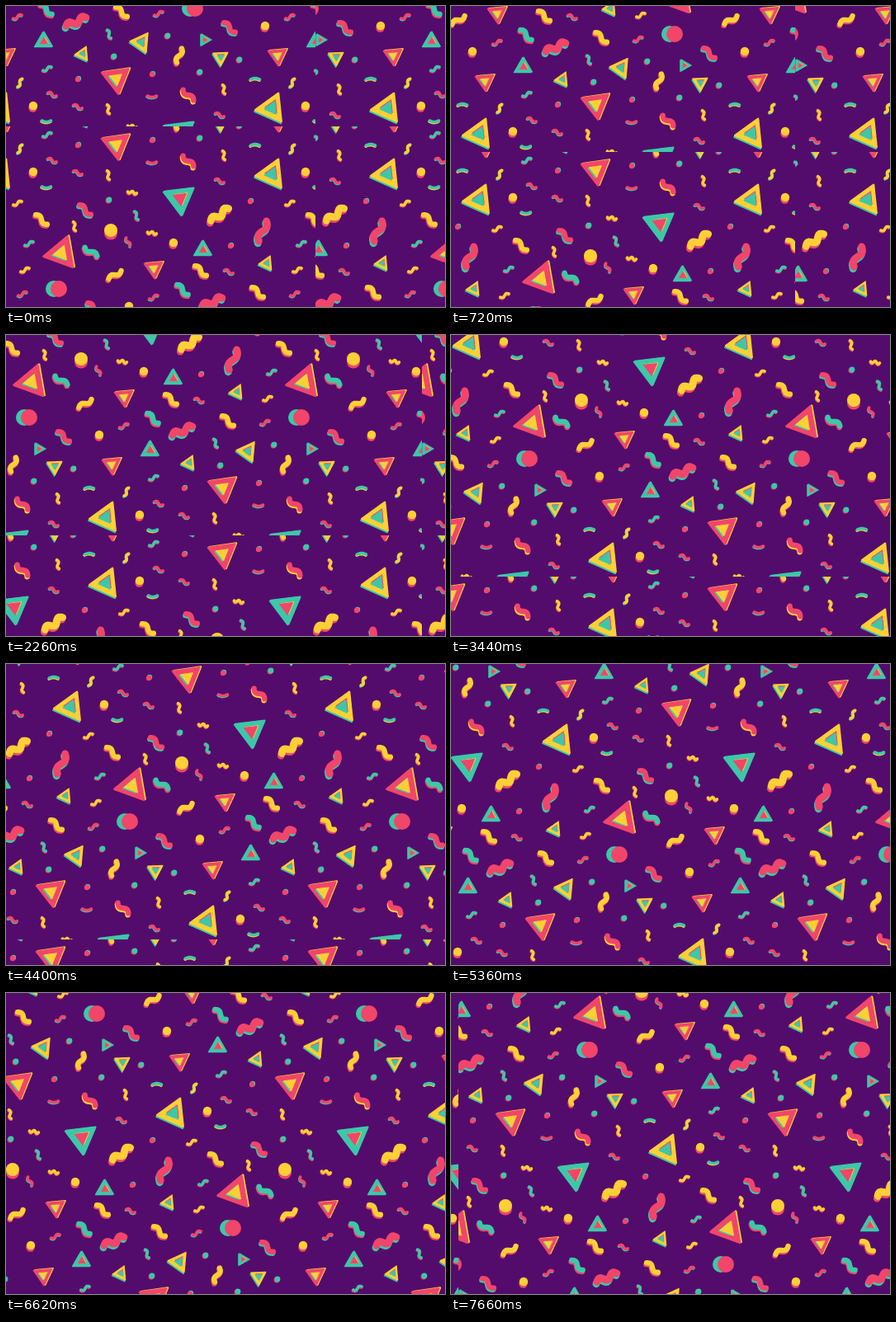
Recreate the animation shown at these times as an HTML page with a canvas. Size 532 px wide and 365 px high, loop 7720 ms.

```html
<!DOCTYPE html>
<html lang="en">
<head>
<meta charset="utf-8">
<title>Confetti drift</title>
<style>
html, body { margin: 0; width: 100%; height: 100%; overflow: hidden; background: #540c6c; }
canvas { display: block; }
</style>
</head>
<body>
<canvas id="stage" width="532" height="365"></canvas>
<script>
const BG = '#540c6c', PINK = '#f2456a', GOLD = '#ffd035', TEAL = '#3cc8a8';
const TILE_W = 800, TILE_H = 600;
const LOOP = 7720, STEP = 73.8, LAST = 104;

const TRIM = {
  [PINK]: { edge: GOLD, core: GOLD, accent: TEAL, dx: 1.6, dy: -0.8 },
  [GOLD]: { edge: TEAL, core: TEAL, accent: PINK, dx: -0.8, dy: 1.8 },
  [TEAL]: { edge: TEAL, core: PINK, accent: GOLD, dx: -1.2, dy: 0.6 },
};
const LARGE = { width: 8.8, length: 26, swing: 3 };
const MEDIUM = { width: 6.4, length: 18, swing: 2.2 };
const SMALL = { width: 3.6, length: 11, swing: 1.5 };

const tile = document.createElement('canvas');
tile.width = TILE_W;
tile.height = TILE_H;
const g = tile.getContext('2d');
g.lineCap = g.lineJoin = 'round';

function disc(x, y, r, color) {
  g.fillStyle = color;
  g.beginPath();
  g.arc(x, y, r, 0, 7);
  g.fill();
}

function dots(ink, shade, r, dx, dy, ...spots) {
  for (const [x, y] of spots) {
    disc(x + dx, y + dy, r, shade);
    disc(x, y, r, ink);
  }
}

// Equilateral, with one corner pointing along tip (degrees).
function triangle(x, y, r, tip, color) {
  g.beginPath();
  for (let k = 0; k < 3; k++) {
    const a = (tip + 120 * k) * Math.PI / 180;
    g.lineTo(x + r * Math.cos(a), y + r * Math.sin(a));
  }
  g.closePath();
  g.fillStyle = g.strokeStyle = color;
  g.lineWidth = r * 0.12;
  g.fill();
  g.stroke();
}

function wedges(ink, r, tip, ...spots) {
  const { edge, core, accent, dx, dy } = TRIM[ink];
  const k = r / 20;
  for (const [x, y] of spots) {
    triangle(x + dx, y + dy, r * 0.95, tip, edge);
    triangle(x, y, r * 0.95, tip, ink);
    triangle(x - dx * k, y - dy * k, r * 0.43, tip, accent);
    triangle(x, y, r * 0.43, tip, core);
  }
}

// A sine stroke turned by some degrees; negative waves mirror it.
function squiggles(ink, shade, { width, length, swing }, turn, waves, ...spots) {
  const lean = width * 0.12, drop = width * 0.3;
  g.lineWidth = width;
  for (const [x, y] of spots)
    for (const [color, dx, dy] of [[shade, -lean, drop], [ink, 0, 0]]) {
      g.save();
      g.translate(x + dx, y + dy);
      g.rotate(turn * Math.PI / 180);
      g.beginPath();
      for (let s = 0; s <= 1.001; s += 0.05)
        g.lineTo(length * (s - 0.5), -swing * Math.sin(2 * Math.PI * waves * s));
      g.strokeStyle = color;
      g.stroke();
      g.restore();
    }
}

function motif() {
  dots(PINK, TEAL, 10, -6, 0, [110, 25]);
  dots(GOLD, PINK, 8, 0, 3.5, [8, 214]);
  dots(GOLD, PINK, 5.2, -0.5, 2.5, [195, 46], [244, 143], [84, 229]);
  dots(TEAL, PINK, 3.4, -1, 1, [77, 58], [12, 83], [164, 87], [116, 102], [6, 177]);
  dots(PINK, TEAL, 3.2, 1, -1, [58, 105], [298, 111], [177, 179], [153, 233]);

  wedges(PINK, 20, 82, [14.5, 110]);
  wedges(PINK, 23, 170, [278, 242]);
  wedges(PINK, 13.5, 85, [210, 82], [60, 260]);
  wedges(GOLD, 21, 174, [203, 146]);
  wedges(GOLD, 14.5, 185, [45, 66]);
  wedges(GOLD, 10.5, 175, [304, 80], [197, 254]);
  wedges(GOLD, 11, 88, [141, 84]);
  wedges(TEAL, 21.5, 83, [92, 175]);
  wedges(TEAL, 12.5, 270, [257, 65], [120, 238]);
  wedges(TEAL, 8.5, 0, [122, 63]);

  squiggles(PINK, TEAL, LARGE, -23, 1.5, [296, 41]);
  squiggles(GOLD, PINK, LARGE, -35, 1.5, [140, 195]);
  squiggles(PINK, TEAL, LARGE, 111, 1, [192, 215]);

  squiggles(PINK, TEAL, MEDIUM, 40, 1, [152, 48], [307, 189]);
  squiggles(GOLD, PINK, MEDIUM, 40, 1, [21, 29], [254, 201], [117, 263]);
  squiggles(GOLD, PINK, MEDIUM, -33, 1, [343, 268]);
  squiggles(GOLD, PINK, MEDIUM, 109, 1, [91, 82]);
  squiggles(TEAL, PINK, MEDIUM, 42, 1, [260, 26]);
  squiggles(TEAL, PINK, MEDIUM, 35, -1, [314, 240]);
  squiggles(PINK, GOLD, MEDIUM, 45, -1, [102, 130]);

  squiggles(PINK, TEAL, SMALL, -22, -1, [66, 31], [225, 35]);
  squiggles(TEAL, PINK, SMALL, -22, -1, [261, 98], [239, 230]);
  squiggles(GOLD, PINK, SMALL, -22, -1, [225, 181], [234, 262]);
  squiggles(PINK, TEAL, SMALL, 20, 1, [140, 154], [267, 129], [298, 144], [151, 264]);
  squiggles(GOLD, PINK, SMALL, 75, 1, [145, 123], [335, 147], [294, 209]);
  squiggles(PINK, TEAL, SMALL, 65, -1, [29, 228]);
  squiggles(TEAL, PINK, SMALL, 65, 1, [6, 56], [39, 196]);
  squiggles(GOLD, TEAL, SMALL, 120, -1, [228, 115]);
  squiggles(TEAL, GOLD, SMALL, 0, 0.5, [183, 111]);
  squiggles(TEAL, GOLD, SMALL, 0, -0.5, [260, 161]);
  squiggles(PINK, TEAL, SMALL, 0, -0.5, [58, 131]);
  squiggles(GOLD, PINK, SMALL, 10, -1.5, [34, 168], [58, 217]);
}

// The motif repeats as a half-drop lattice inside one tile.
g.fillStyle = BG;
g.fillRect(0, 0, TILE_W, TILE_H);
for (let row = -2; row <= 3; row++)
  for (let col = -3; col <= 4; col++) {
    g.save();
    g.translate(49 + 330 * col + 165 * row, 172 + 260 * row);
    motif();
    g.restore();
  }

const ctx = document.getElementById('stage').getContext('2d');

function frame(now) {
  const n = Math.min(LAST, Math.floor((now % LOOP + 30) / STEP));
  const x = Math.round(375 + n * 4.175), y = Math.round(146 + n * 3.13);
  for (let i = 0; i < 3; i++)
    for (let j = 0; j < 2; j++)
      ctx.drawImage(tile, x - TILE_W * i, y - TILE_H * j);
  requestAnimationFrame(frame);
}
requestAnimationFrame(frame);
</script>
</body>
</html>
```
